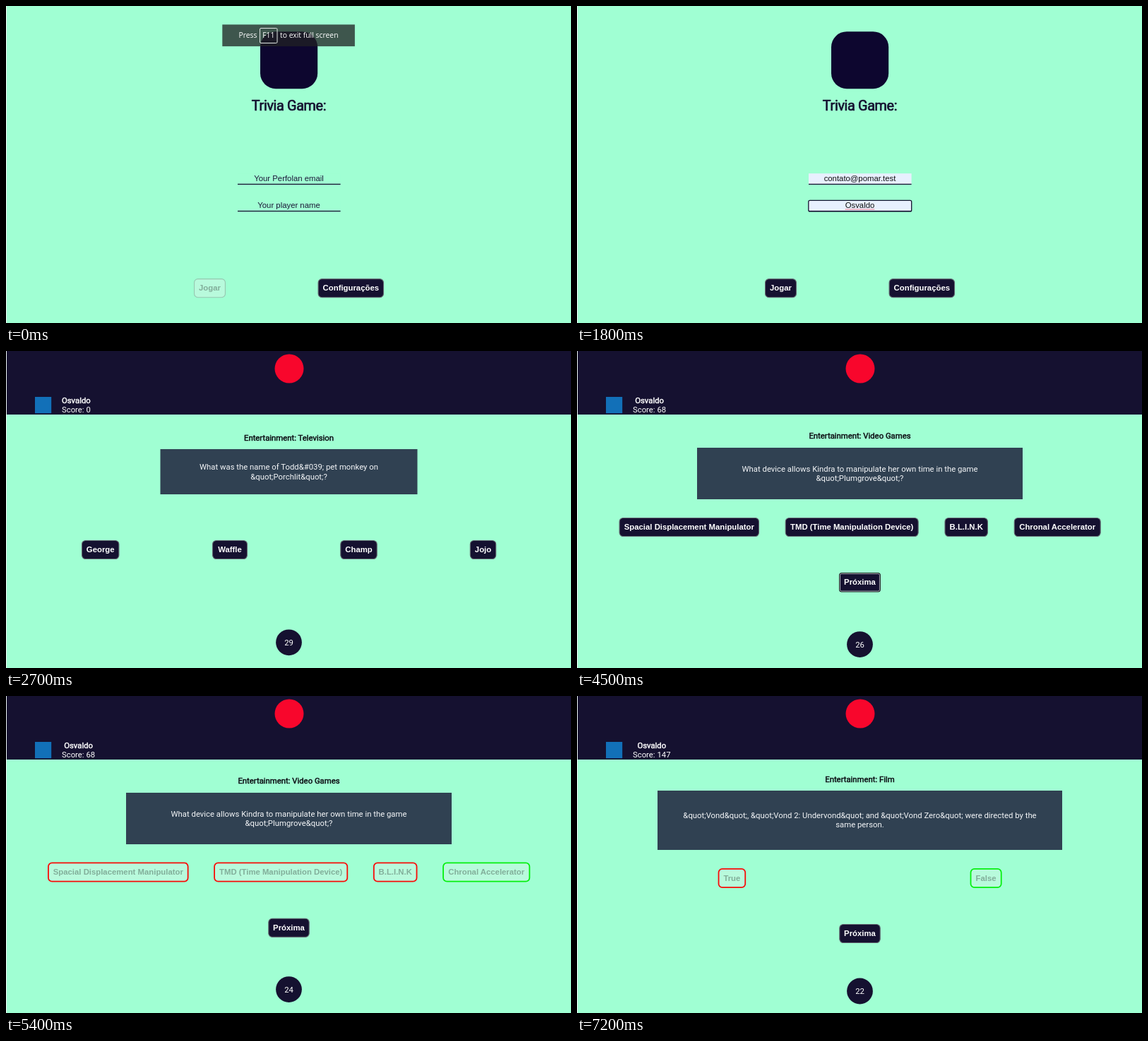
Recreate the animation shown at these times as an HTML page. Size 800 by 449 pixels, loop 8000 ms.

```html
<!DOCTYPE html>
<html lang="en">
<head>
<meta charset="utf-8">
<title>Trivia Game</title>
<style>
html, body { margin: 0; width: 100%; height: 100%; overflow: hidden; background: #a0ffd3; }
svg { display: block; width: 100vw; height: 100vh; }
text { white-space: pre; }
.roboto { font: 11.33px Roboto, sans-serif; }
.heavy { stroke: currentColor; stroke-width: .45px; }
.title { font-size: 19.8px; letter-spacing: -.35px; stroke-width: .7px; }
.arial { font: 11.35px "Liberation Sans", Arial, sans-serif; }
.bold { font-weight: 700; }
.hint { font: 10.4px "Open Sans", sans-serif; }
</style>
</head>
<body>
<svg id="stage" viewBox="0 0 800 449" preserveAspectRatio="none"></svg>
<script>
const LOOP = 8000, STEP = 900;
const MINT = '#a0ffd3', NAVY = '#151130', SLATE = '#304152';
const MID = 400.5;
const PLAYER = 'Osvaldo', EMAIL = 'contato@pomar.test';

const esc = s => String(s).replace(/&/g, '&amp;').replace(/</g, '&lt;');

const rect = (x, y, w, h, fill, extra = '') =>
  `<rect x="${x}" y="${y}" width="${w}" height="${h}" fill="${fill}" ${extra}/>`;

const text = (s, x, y, cls, fill, anchor = 'middle') =>
  `<text x="${x}" y="${y}" class="${cls}" fill="${fill}" color="${fill}" text-anchor="${anchor}">${esc(s)}</text>`;

// Button looks: normal, off, wrong, right, focus
const EDGES = { normal: '#62666f', off: 'rgba(118,118,118,.4)', wrong: '#f80c08', right: '#06f00f', focus: '#101010' };

function button(label, cx, cy, w, look = 'normal') {
  const marked = look === 'wrong' || look === 'right';
  const off = marked || look === 'off';
  const thick = marked ? 1.8 : 1.1;
  const bw = w + (marked ? 1 : 0), bh = marked ? 28.2 : 27.2;
  const box = (inset, fill, stroke, sw, r) => rect(
    cx - bw / 2 + inset, cy - bh / 2 + inset, bw - 2 * inset, bh - 2 * inset, fill,
    `rx="${r}" stroke="${stroke}" stroke-width="${sw}"`);
  const body = look === 'focus'
    ? box(.4, NAVY, EDGES.focus, 1, 2.5) + box(1.3, 'none', '#e9f2ef', .7, 2)
    : box(thick / 2, off ? 'rgba(239,239,239,.3)' : NAVY, EDGES[look], thick, 5.2);
  return body + text(label, cx, cy + 3.6, 'arial bold', off ? 'rgba(16,16,16,.32)' : '#fff');
}

// Login field: typed value or placeholder
function field(y, value, hint, focused) {
  const fill = value ? '#e8f0fe' : MINT;
  const frame = focused
    ? rect(327.8, y - 15, 145.9, 15.6, fill, `rx="2" stroke="${NAVY}" stroke-width="1.3"`)
    : rect(328, y - 15, 145.6, 15, fill);
  return frame + rect(328, y - .4, 145.6, 1.3, NAVY) +
    text(value || hint, MID, y - 4, 'arial', value ? '#111' : '#1b1738');
}

function hintBar() {
  return rect(306.3, 26.3, 187.6, 30.8, 'rgba(32,33,36,.76)') +
    rect(359.5, 31.5, 24.5, 21, 'none', 'rx="1.5" stroke="#dfe6e3" stroke-width="1"') +
    text('Press', 329.5, 45.4, 'hint', '#fff', 'start') +
    text('F11', 371.8, 45.4, 'hint', '#fff') +
    text('to exit full screen', 388, 45.4, 'hint', '#fff', 'start');
}

function login({ bar, email, name, focus }) {
  return rect(360, 36.2, 81.2, 81, '#0d062f', 'rx="22"') +
    text('Trivia Game:', MID, 147.8, 'roboto heavy title', NAVY) +
    field(252.2, email, 'Your Perfolan email', focus === 'email') +
    field(290.3, name, 'Your player name', focus === 'name') +
    (name ? '<path d="M380 288H421" stroke="#f0475a" stroke-width="1.1" stroke-dasharray="1.4 .7"/>' : '') +
    button('Jogar', 288.5, 399.7, 45, name ? 'normal' : 'off') +
    button('Configurações', 488.3, 399.7, 93.5) +
    (bar ? hintBar() : '');
}

function header(score) {
  const cx = 99.4 + 3.2 * (String(score).length - 1);
  return rect(1, 0, 799, 90, NAVY) +
    '<circle cx="401" cy="25" r="20.5" fill="#f8062c"/>' +
    rect(41, 65, 23.2, 23.2, '#1270b8') +
    text(PLAYER, cx, 73.6, 'roboto heavy', '#fff') +
    text('Score: ' + score, 79, 87.2, 'roboto', '#fff', 'start');
}

// box: [x, y, w, h]; options: [label, centre, width]
const QUIZ = [
  { topic: 'Television', base: 126.8, box: [218.5, 139, 364, 64], line: 168.2,
    lines: ['What was the name of Todd&#039; pet monkey on', '&quot;Porchlit&quot;?'],
    options: [['George', 133.7, 53.5], ['Waffle', 317, 50], ['Champ', 499.5, 52.5], ['Jojo', 675.5, 37.5]],
    right: 1, row: 242, next: 321, clock: 412.8 },
  { topic: 'Video Games', base: 124.2, box: [170, 137, 461, 73], line: 170.8,
    lines: ['What device allows Kindra to manipulate her own time in the game', '&quot;Plumgrove&quot;?'],
    options: [['Spacial Displacement Manipulator', 158.8, 198.5], ['TMD (Time Manipulation Device)', 389.2, 189],
      ['B.L.I.N.K', 551.2, 61.5], ['Chronal Accelerator', 680.2, 123]],
    right: 3, row: 249.5, next: 328.3, clock: 415.6 },
  { topic: 'Film', base: 121.5, box: [114, 134, 573, 84], line: 173,
    lines: ['&quot;Vond&quot;, &quot;Vond 2: Undervond&quot; and &quot;Vond Zero&quot; were directed by the', 'same person.'],
    options: [['True', 219.4, 38.5], ['False', 579.1, 44]],
    right: 1, row: 258, next: 336.5, clock: 418 }
];

function quiz({ q, score, left, answered, next, row }) {
  const k = QUIZ[q];
  const look = i => !answered ? 'normal' : i === k.right ? 'right' : 'wrong';
  return header(score) +
    text('Entertainment: ' + k.topic, MID, k.base, 'roboto heavy', '#0b0b12') +
    rect(...k.box, SLATE) +
    k.lines.map((s, i) => text(s, MID, k.line + 13.4 * i, 'roboto', '#f4f6f8')).join('') +
    k.options.map(([s, x, w], i) => button(s, x, row || k.row, w, look(i))).join('') +
    (next ? button('Próxima', MID, k.next - (next === 'focus' ? .5 : 0), 58.5, next) : '') +
    `<circle cx="${MID}" cy="${k.clock}" r="18.4" fill="${NAVY}"/>` +
    text(left, MID, k.clock + 3.9, 'roboto', '#fff');
}

const SCENES = [
  () => login({ bar: true }),
  () => login({ email: EMAIL, focus: 'email' }),
  () => login({ email: EMAIL, name: PLAYER, focus: 'name' }),
  () => quiz({ q: 0, score: 0, left: 29, row: 281.5 }),
  () => quiz({ q: 0, score: 68, left: 27, answered: true, next: 'normal' }),
  () => quiz({ q: 1, score: 68, left: 26, next: 'focus' }),
  () => quiz({ q: 1, score: 68, left: 24, answered: true, next: 'normal' }),
  () => quiz({ q: 2, score: 68, left: 23, next: 'focus' }),
  () => quiz({ q: 2, score: 147, left: 22, answered: true, next: 'normal' })
];

const stage = document.getElementById('stage');
let shown = -1;

function draw(ms) {
  const i = Math.min(SCENES.length - 1, Math.floor((ms % LOOP) / STEP));
  if (i === shown) return;
  shown = i;
  stage.innerHTML = rect(0, 0, 800, 449, MINT) + SCENES[i]() + rect(0, 0, 1, 449, '#ecf8f3');
}

const start = performance.now();
function tick() {
  draw(performance.now() - start);
  requestAnimationFrame(tick);
}
tick();
</script>
</body>
</html>
```
